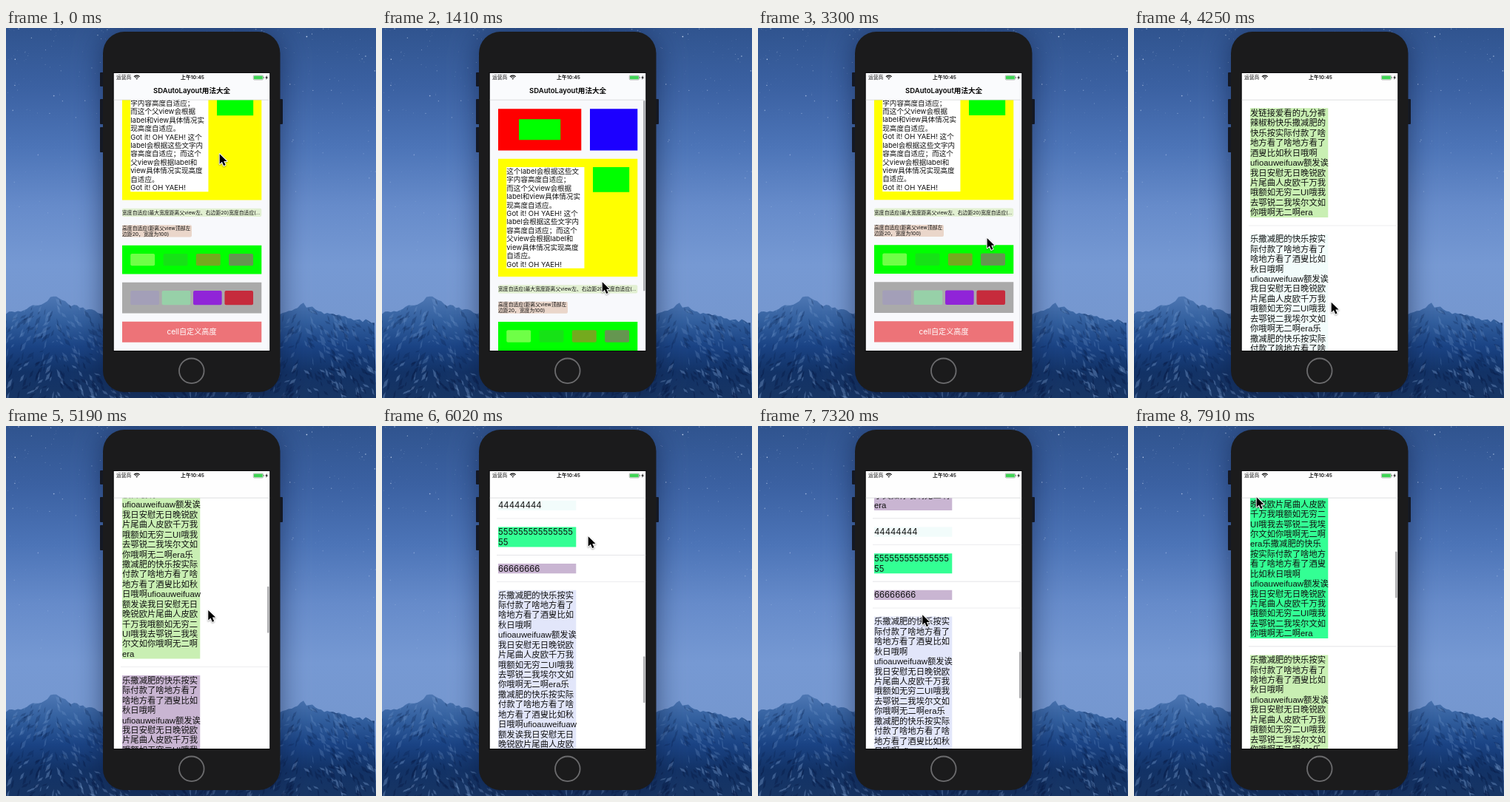
These frames come from a looping animation (500 by 500 pixels, 8 s). An HTML page with a canvas:

```html
<!DOCTYPE html>
<html lang="zh-CN">
<head>
<meta charset="utf-8">
<title>SDAutoLayout</title>
<style>
html, body { margin: 0; width: 100%; height: 100%; overflow: hidden; background: #3c64a8; }
canvas { display: block; width: 500px; height: 500px; }
</style>
</head>
<body>
<canvas id="stage"></canvas>
<script>
const LOOP = 8000;
const FIRST_TICK = 340, TICK = 118.125;
const PAGE_CUT = 30;                    // tick at which the second page appears
const canvas = document.getElementById('stage');
const dpr = window.devicePixelRatio || 1;
canvas.width = canvas.height = 500 * dpr;
let g = canvas.getContext('2d');

const CJK = '"Noto Sans CJK SC", "Noto Sans CJK", sans-serif';
const UI = 'Inter, ' + CJK;
const BODY = '"Liberation Sans", ' + CJK;
const LIME = '#c9efb3', MINT = '#f2fcfb', GREEN = '#33ff94', MAUVE = '#c9b5d2', LILAC = '#e2e6fa';
const TOP = 97, BOTTOM = 436, LEFT = 157, RIGHT = 345.3, GAP = 11.25;

// ---------- drawing helpers ----------
function rect(x, y, w, h, color, radius = 0) {
  g.fillStyle = color;
  g.beginPath();
  g.roundRect(x, y, w, h, radius);
  g.fill();
}
function poly(color, points) {
  g.fillStyle = color;
  g.beginPath();
  points.forEach(([x, y]) => g.lineTo(x, y));
  g.closePath();
  g.fill();
}
function text(str, x, y, size, { color = '#111', weight = 400, align = 'left', font = UI } = {}) {
  g.font = `${weight} ${size}px ${font}`;
  g.fillStyle = color;
  g.textAlign = align;
  g.fillText(str, x, y);
}
function lines(list, x, top, pitch, size, font) {
  list.forEach((s, i) => {
    const y = top + i * pitch;
    if (y < BOTTOM && y + pitch > TOP) text(s, x, y + pitch * 0.8, size, { font });
  });
}
function fade(y0, y1, ...colors) {
  const f = g.createLinearGradient(0, y0, 0, y1);
  colors.forEach((c, i) => f.addColorStop(i / (colors.length - 1), c));
  return f;
}
function seeded(seed) {
  return () => (seed = (seed * 16807) % 2147483647) / 2147483647;
}

// ---------- motion helpers ----------
const clamp = v => Math.max(0, Math.min(1, v));
const mix = (a, b, p) => a + (b - a) * p;
const smooth = p => p * p * (3 - 2 * p);
const glide = (k, from, to) => smooth(clamp((k - from) / (to - from)));

// Eases through key points [tick, ...values].
function track(k, points) {
  const next = points.find(p => p[0] > k) || points[points.length - 1];
  const prev = points[Math.max(0, points.indexOf(next) - 1)];
  const p = glide(k, prev[0], next[0]);
  return next.slice(1).map((v, i) => mix(prev[i + 1], v, p));
}

// ---------- wallpaper and phone ----------
function mountain(rnd, x0, x1, peak, height, slope) {
  const ridge = [];
  for (let x = x0; x <= x1; x += 4) {
    const d = Math.abs(x - peak);
    ridge.push([x, height + 30 * (1 - Math.exp(-d / slope)) + (rnd() - 0.5) * 5]);
  }
  poly(fade(360, 500, '#5079b5', '#33609f', '#1a4384', '#123266', '#173564'),
    [...ridge, [x1, 500], [x0, 500]]);
  g.save();
  g.clip();
  for (let i = 0; i < 520; i++) {
    const x = mix(x0, x1, rnd()), y = mix(height, 500, rnd());
    const dir = x < peak ? -1 : 1, w = (2 + rnd() * 8) * dir, h = 2 + rnd() * 8;
    const low = y > 450;
    const light = rnd() < (low ? 0.42 : 0.5);
    poly(light ? `rgba(128,163,212,${low ? 0.36 : 0.22})` : `rgba(8,28,70,${low ? 0.42 : 0.24})`,
      [[x, y], [x + w * 0.7, y + h * 0.5], [x + w, y + h * 1.4], [x + w * 0.3, y + h]]);
  }
  g.restore();
}
function stars(rnd) {
  for (let i = 0; i < 560; i++) {
    const y = rnd() ** 1.4 * 300, size = 0.5 + rnd() ** 4 * 1.3;
    const alpha = (0.25 + rnd() * 0.65) * (1 - y / 360);
    rect(rnd() * 500, y, size, size, `rgba(222,234,255,${alpha})`, size / 2);
  }
}
function phone() {
  for (const [x, y, h] of [[127, 60, 19], [127, 96, 34], [127, 134, 34], [368, 96, 34]]) {
    rect(x, y, 6, h, '#17181b', 1);
  }
  g.save();
  g.shadowColor = 'rgba(10,24,60,.55)';
  g.shadowBlur = 36 * dpr;
  g.shadowOffsetY = 4 * dpr;
  rect(131, 5, 239.5, 487, '#1b1b1c', 29);
  g.restore();
  rect(144.5, 60, 213, 377, '#0b0b0c');
  g.strokeStyle = '#6b6b6d';
  g.lineWidth = 1.8;
  g.beginPath();
  g.arc(250.8, 463.3, 16.8, 0, 7);
  g.stroke();
}
function paintBackdrop() {
  const layer = document.createElement('canvas');
  layer.width = layer.height = canvas.width;
  const screen = g, rnd = seeded(77);
  g = layer.getContext('2d');
  g.scale(dpr, dpr);
  rect(0, 0, 500, 500, fade(0, 400, '#30548f', '#3b61a2', '#4c74b7', '#668bca', '#7699d3', '#7597cf'));
  stars(rnd);
  mountain(rnd, 0, 250, 66, 361, 40);
  mountain(rnd, 250, 500, 401, 373, 60);
  phone();
  g = screen;
  return layer;
}

// ---------- interface parts ----------
function navBar(title) {
  rect(145.5, 61, 211, 36, title ? '#fafbfd' : '#fefefe');
  rect(145.5, 96.8, 211, 0.6, '#d2d3d6');
  text('运营商', 149, 69.3, 6.8);
  g.strokeStyle = '#111';
  g.lineWidth = 1.2;
  for (const r of [3.1, 5.1]) {
    g.beginPath();
    g.arc(176.8, 69.2, r, -Math.PI * 0.77, -Math.PI * 0.23);
    g.stroke();
  }
  poly('#111', [[176.8, 69.7], [175.4, 67.9], [178.2, 67.9]]);
  text('上午10:45', 252, 69.4, 6.8, { weight: 600, align: 'center' });
  g.strokeStyle = '#7c857c';
  g.lineWidth = 0.6;
  g.beginPath();
  g.roundRect(334.3, 64, 13.2, 6, 1.3);
  g.stroke();
  rect(335, 64.7, 11.8, 4.6, '#3fd454', 0.7);
  rect(348.1, 66, 0.8, 2, '#7c857c');
  poly('#111', [[352.7, 63.9], [350.3, 67.4], [351.9, 67.4], [351.4, 70.1], [354, 66.5], [352.3, 66.5]]);
  if (title) text(title, 251, 88.4, 9.57, { weight: 600, align: 'center', color: '#000' });
}
function scrollBar(y, h, alpha) {
  rect(353.3, y, 2, h, `rgba(90,90,95,${0.6 * alpha})`, 1);
}
const ARROW = new Path2D('M.7 1.2V14.8L3.9 11.8L6.2 17L8.6 16L6.3 10.9H10.6Z');
function pointer(x, y) {
  g.save();
  g.translate(x, y);
  g.shadowColor = 'rgba(0,0,0,.35)';
  g.shadowBlur = 2 * dpr;
  g.shadowOffsetY = dpr;
  g.lineJoin = 'round';
  g.strokeStyle = '#fff';
  g.lineWidth = 2;
  g.stroke(ARROW);
  g.shadowColor = 'transparent';
  g.fillStyle = '#000';
  g.fill(ARROW);
  g.restore();
}

// ---------- first page: layout samples ----------
const INTRO = '这个label会根据这些文/字内容高度自适应；/而这个父view会根据/label和view具体情况实/现高度自适应。/Got it! OH YAEH! 这个/label会根据这些文字内/容高度自适应；而这个/父view会根据label和/view具体情况实现高度/自适应。/Got it! OH YAEH!'.split('/');
const END_A = 103;

function chips(top, height, gap, colors) {
  const x = LEFT + GAP, w = (RIGHT - GAP - x + gap) / colors.length - gap;
  colors.forEach((c, i) => rect(x + i * (w + gap), top, w, height, c, 2));
}
// Stacked blocks: height, then how to draw the block at y.
const BLOCKS = [
  [56.2, y => {
    rect(LEFT, y, 112.3, 56.2, '#f00');
    rect(LEFT + 28, y + 14, 56.2, 28.1, '#0f0');
    rect(281, y, RIGHT - 281, 56.2, '#1c00ff');
  }],
  [159.3, y => {
    rect(LEFT, y, RIGHT - LEFT, 159.3, '#ff0');
    rect(LEFT + GAP, y + GAP, 105.2, 136.9, '#fff');
    rect(285, y + GAP, 49.2, 33.8, '#0f0');
    lines(INTRO, LEFT + GAP, y + GAP, 11.41, 9.57);
  }],
  [11.3, y => {
    rect(LEFT, y, RIGHT - LEFT, 11.3, '#e2f0d2', 2);
    text('宽度自适应(最大宽度距离父view左、右边距20)宽度自适应(…', LEFT, y + 8.3, 6.82);
  }],
  [16.1, y => {
    rect(LEFT, y, 94, 16.1, '#ead6ca', 2);
    lines(['高度自适应(距离父view顶部左', '边距20，宽度为100)'], LEFT, y, 8.06, 6.82);
  }],
  [38.8, y => {
    rect(LEFT, y, RIGHT - LEFT, 38.8, '#0f0');
    chips(y + GAP, 16.4, 11.4, ['#6fff47', '#16e216', '#74aa1e', '#659650']);
  }],
  [41.7, y => {
    rect(LEFT, y, RIGHT - LEFT, 41.7, '#aaa');
    chips(y + GAP, 19.3, 3.8, ['#a39fb8', '#97d0a8', '#9024d8', '#c62b3c']);
  }],
  [28.1, y => {
    rect(LEFT, y, RIGHT - LEFT, 28.1, '#ed7378');
    text('cell自定义高度', 251, y + 17.7, 10.13, { color: '#fff', align: 'center' });
  }]
];
const rubber = s => {
  const inside = Math.max(0, Math.min(END_A, s));
  return inside + (s - inside) * 0.4;
};
// Drag down past the top, spring back, drag up past the end, settle.
function poseA(k) {
  const [x, y] = track(k, [[-1, 288, 169], [6, 297, 342], [9, 297, 342], [14, 317, 342],
    [17, 314, 189.5], [19, 314, 190], [27, 308, 300]]);
  const scroll = k <= 6 ? rubber(END_A - (y - 169))
    : k <= 14 ? rubber(END_A - 173) * 0.25 ** (k - 6)
    : k <= 17 ? rubber(342 - y)
    : END_A + 20 * 0.6 ** (k - 17);
  return { x, y, scroll };
}
function pageA(k, scroll) {
  rect(145.5, TOP, 211, BOTTOM - TOP, '#f8f9fc');
  let y = TOP + GAP + 0.5 - scroll;
  for (const [h, paint] of BLOCKS) {
    paint(y);
    y += h + GAP;
  }
  const h = 258 - Math.max(0, -scroll, scroll - END_A);
  const barY = Math.min(98 + Math.max(0, scroll) * 0.757, 434 - h);
  if (k >= 0) scrollBar(barY, h, 1 - glide(k, 19, 27));
}

// ---------- second page: table of self-sizing cells ----------
const PITCH = 13.43;
const CORE = 'ufioauweifuaw额发诶/我日安慰无日晚锐欧/片尾曲人皮欧千万我/哦额如无穷二UI哦我/去鄂锐二我埃尔文如/你哦啊无二啊era';
const LONG = '乐撒减肥的快乐按实/际付款了啥地方看了/啥地方看了酒叟比如/秋日哦啊/' + CORE +
  '乐/撒减肥的快乐按实际/付款了啥地方看了啥/地方看了酒叟比如秋/日哦啊ufioauweifuaw/额发诶我日安慰无日/晚锐欧片尾曲人皮欧/千万我哦额如无穷二/UI哦我去鄂锐二我埃/尔文如你哦啊无二啊/era';
const digits = (d, extra) => d.repeat(15) + '/' + d.repeat(extra);
const ROWS = [
  ['发链接爱看的九分裤/辣椒粉快乐撒减肥的/快乐按实际付款了啥/地方看了啥地方看了/酒叟比如秋日哦啊/' + CORE, LIME],
  [LONG + '乐撒减肥的快乐/按实际付款了啥地方/看了啥地方看了酒叟/比如秋日哦啊/' + CORE, MINT, GREEN],
  [LONG, LIME], [LONG, MAUVE], ['44444444', MINT], [digits('5', 2), GREEN], ['66666666', MAUVE],
  [LONG, LILAC], [digits('8', 2), MINT], [digits('9', 3), MAUVE]
].map(([s, color, reused = color]) => ({
  list: s.split('/'), color, reused, font: /^\d/.test(s) ? UI : BODY
}));

function poseB(k) {
  const [x, y] = track(k, [[30, 285, 385], [33, 266, 369.5], [48, 278, 148], [54, 278, 413], [64, 165, 95]]);
  const [scroll] = track(k, [[33, 0], [48, 1172], [54, 1323], [57, 1323], [64, 381]]);
  return { x, y, scroll };
}
function pageB(k, scroll) {
  rect(145.5, TOP, 211, BOTTOM - TOP, '#fff');
  let y = TOP - scroll;
  for (const { list, color, reused, font } of ROWS) {
    const h = list.length * PITCH, end = y + h + 2 * GAP;
    if (end > TOP && y < BOTTOM) {
      rect(LEFT, y + GAP, 105.3, h, k > 54 ? reused : color);
      lines(list, LEFT, y + GAP, PITCH, 11.35, font);
      rect(155, end - 0.6, 201.5, 0.6, '#dcdce0');
    }
    y = end;
  }
  if (k > 33) scrollBar(101 + scroll * 0.1795, 63, 1);
}

// ---------- loop ----------
const backdrop = paintBackdrop();

function draw(t) {
  const k = Math.max(-1, Math.floor((t - FIRST_TICK) / TICK));
  const first = k < PAGE_CUT;
  const { x, y, scroll } = (first ? poseA : poseB)(k);
  g.setTransform(dpr, 0, 0, dpr, 0, 0);
  g.drawImage(backdrop, 0, 0, 500, 500);
  g.save();
  g.beginPath();
  g.rect(145.5, 61, 211, BOTTOM - 61);
  g.clip();
  (first ? pageA : pageB)(k, scroll);
  navBar(first ? 'SDAutoLayout用法大全' : '');
  g.restore();
  pointer(x, y);
}

const start = performance.now();
function tick() {
  draw((performance.now() - start) % LOOP);
  requestAnimationFrame(tick);
}
tick();
</script>
</body>
</html>
```
